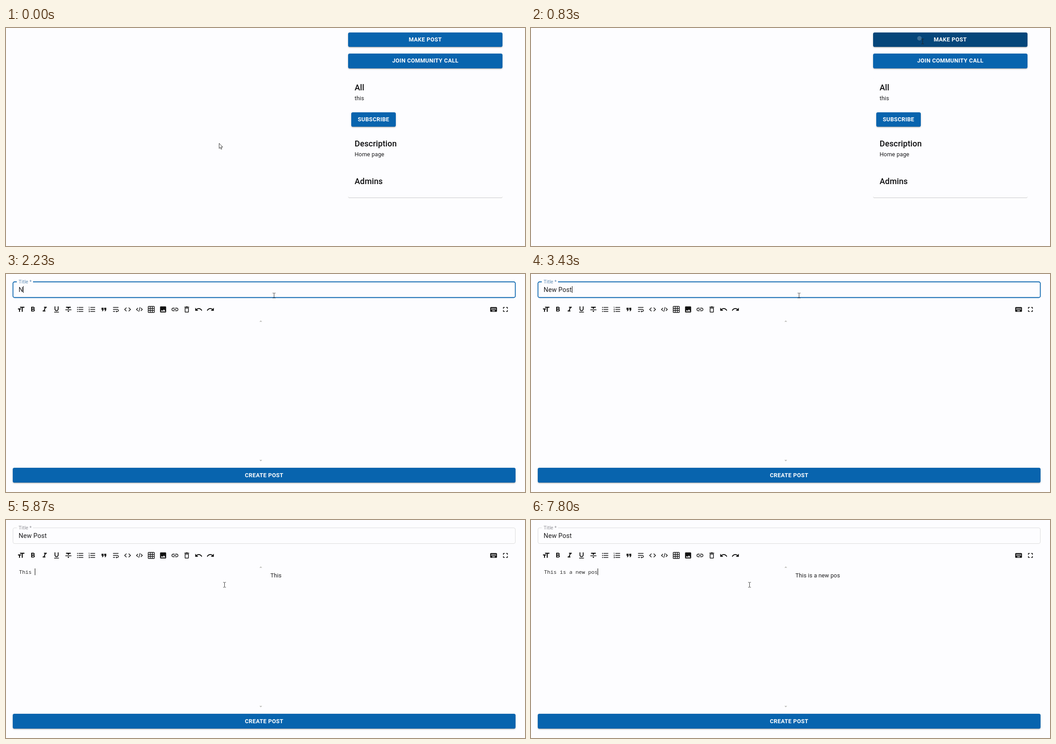
These frames come from a looping animation (1153 by 486 pixels, 8 s). An HTML page:

```html
<!DOCTYPE html>
<html lang="en">
<head>
<meta charset="utf-8">
<style>
html, body { margin: 0; width: 100%; height: 100%; overflow: hidden; background: #fdfdff; }
.button, .paper { position: absolute; border-radius: 3.6px; }
.button {
  background: #0864ae; overflow: hidden;
  box-shadow: 0 2.7px 1px -2px #0003, 0 1.8px 1.8px #0002, 0 1px 4px #0002;
}
.paper { left: 760px; top: 110px; width: 343px; height: 268px; box-shadow: 0 1px 0 #c8c8c8; }
#ripple { position: absolute; border-radius: 50%; background: #fff; }
svg { position: absolute; left: 0; top: 0; font: 12.6px Roboto, sans-serif; letter-spacing: .135px; fill: #1c1c1e; }
.caps { font-weight: 600; letter-spacing: .36px; text-anchor: middle; fill: #fff; }
.heading { font-size: 18px; font-weight: 500; fill: #0c0c0e; }
.field { font-size: 14.4px; }
.mono { font: 11.667px "Noto Sans Mono", monospace; letter-spacing: 0; fill: #2a2a2a; }
text { white-space: pre; }
</style>
</head>
<body>
<div id="home">
  <div class="button" id="make" style="left:760px;top:9.5px;width:343px;height:32.5px"><div id="ripple"></div></div>
  <div class="button" style="left:760px;top:57px;width:343px;height:32.5px"></div>
  <div class="button" style="left:767px;top:187.5px;width:99px;height:32px"></div>
  <div class="paper"></div>
  <svg width="1153" height="486">
    <g class="caps">
      <text x="931.5" y="30">MAKE POST</text>
      <text x="931.5" y="77">JOIN COMMUNITY CALL</text>
      <text x="816.5" y="208">SUBSCRIBE</text>
    </g>
    <g class="heading">
      <text x="774.5" y="139">All</text>
      <text x="774.5" y="264">Description</text>
      <text x="774.5" y="348">Admins</text>
    </g>
    <text x="774.5" y="161">this</text>
    <text x="774.5" y="285.5">Home page</text>
  </svg>
</div>
<div id="editor">
  <div class="button" style="left:15px;top:432px;width:1117px;height:32.5px"></div>
  <svg width="1153" height="486">
    <text class="caps" x="573.5" y="453">CREATE POST</text>
    <rect id="outline" x="15.5" y="17.5" width="1116" height="35" rx="3.6" fill="none"/>
    <rect id="notch" x="24" y="15" height="5" fill="#fdfdff"/>
    <text id="label" class="field">Title *</text>
    <text id="title" class="field" x="28" y="40"></text>
    <g id="icons" fill="#111" fill-rule="evenodd"></g>
    <path d="M563 106.5h6l-3-3zM563 414.5h6l-3 3z" fill="#b9b9b5"/>
    <text id="source" class="mono" x="29" y="120"></text>
    <text id="preview" x="587.5" y="128"></text>
    <rect id="caret" width="1" height="15" fill="#000"/>
  </svg>
</div>
<svg width="1153" height="486">
  <path id="cursor" stroke="#222" stroke-width=".9"/>
</svg>
<script>
const $ = id => document.getElementById(id);
const undo = 'M12.5 8c-2.65 0-5.05.99-6.9 2.6L2 7v9h9l-3.62-3.62c1.39-1.16 3.16-1.88 5.12-1.88 3.54 0 6.55 2.31 7.6 5.5l2.37-.78C21.08 11.03 17.15 8 12.5 8z';
const lines = 'M7 5h14v2H7zM7 11h14v2H7zM7 17h14v2H7z';
const dot = y => `M2.5 ${y}a1.5 1.5 0 1 0 3 0a1.5 1.5 0 1 0-3 0z`;
const cells = (xs, ys, s) => xs.flatMap(x => ys.map(y => `M${x} ${y}h${s}v${s}h-${s}z`)).join('');

const icons = [
  'M9 4v3h5v12h3V7h5V4H9zm-6 8h3v7h3v-7h3V9H3v3z',
  'M15.6 10.79c.97-.67 1.65-1.77 1.65-2.79 0-2.26-1.75-4-4-4H7v14h7.04c2.09 0 3.71-1.7 3.71-3.79 0-1.52-.86-2.82-2.15-3.42zM10 6.5h3c.83 0 1.5.67 1.5 1.5s-.67 1.5-1.5 1.5h-3v-3zm3.5 9H10v-3h3.5c.83 0 1.5.67 1.5 1.5s-.67 1.5-1.5 1.5z',
  'M10 4v3h2.21l-3.42 8H6v3h8v-3h-2.21l3.42-8H18V4z',
  'M12 17c3.31 0 6-2.69 6-6V3h-2.5v8c0 1.93-1.57 3.5-3.5 3.5S8.5 12.93 8.5 11V3H6v8c0 3.31 2.69 6 6 6zm-7 2v2h14v-2H5z',
  'M10 19h4v-3h-4v3zM5 4v3h5v3h4V7h5V4H5zM3 14h18v-2H3v2z',
  lines + dot(6) + dot(12) + dot(18),
  lines + 'M2 17h2v.5H3v1h1v.5H2v1h3v-4H2v1zm1-9h1V4H2v1h1v3zm-1 3h1.8L2 13.1v.9h3v-1H3.2L5 10.9V10H2v1z',
  'M6 17h3l2-4V7H5v6h3zm8 0h3l2-4V7h-6v6h3z',
  'M4 19h6v-2H4v2zM20 5H4v2h16V5zm-3 6H4v2h13.25c1.1 0 2 .9 2 2s-.9 2-2 2H15v-2l-3 3 3 3v-2h2c2.21 0 4-1.79 4-4s-1.79-4-4-4z',
  'M9.4 16.6L4.8 12l4.6-4.6L8 6l-6 6 6 6 1.4-1.4zm5.2 0l4.6-4.6-4.6-4.6L16 6l6 6-6 6-1.4-1.4z',
  'M7 7l-5 5 5 5 1.4-1.4L4.8 12l3.6-3.6zM17 7l5 5-5 5-1.4-1.4 3.6-3.6-3.6-3.6zM13 5h1.8l-3.8 14H9.2z',
  'M4 2h16q2 0 2 2v16q0 2-2 2H4q-2 0-2-2V4q0-2 2-2z' + cells([4, 10, 16], [4, 10, 16], 4),
  'M21 19V5c0-1.1-.9-2-2-2H5c-1.1 0-2 .9-2 2v14c0 1.1.9 2 2 2h14c1.1 0 2-.9 2-2zM8.5 13.5l2.5 3.01L14.5 12l4.5 6H5l3.5-4.5z',
  'M3.9 12c0-1.71 1.39-3.1 3.1-3.1h4V7H7c-2.76 0-5 2.24-5 5s2.24 5 5 5h4v-1.9H7c-1.71 0-3.1-1.39-3.1-3.1zM8 13h8v-2H8v2zm9-6h-4v1.9h4c1.71 0 3.1 1.39 3.1 3.1s-1.39 3.1-3.1 3.1h-4V17h4c2.76 0 5-2.24 5-5s-2.24-5-5-5z',
  'M6 19c0 1.1.9 2 2 2h8c1.1 0 2-.9 2-2V7H6v12zM8 9h8v10H8V9zm7.5-5l-1-1h-5l-1 1H5v2h14V4z',
  undo,
  undo,
  'M4 5h16q2 0 2 2v10q0 2-2 2H4q-2 0-2-2V7q0-2 2-2zM8 15h8v2H8z' + cells([5, 8, 11, 14, 17], [8, 11], 2),
  'M7 14H5v5h5v-2H7v-3zm-2-4h2V7h3V5H5v5zm12 7h-3v2h5v-5h-2v3zM14 5v2h3v3h2V5h-5z'
];
$('icons').innerHTML = icons.map((d, i) => {
  const x = i < 17 ? 33.4 + i * 26.3 : 1083.2 + (i - 17) * 26.3;
  const flip = i === 16 ? -1 : 1;
  return `<path d="${d}" transform="translate(${x} 79) scale(${.75 * flip} .75) translate(-12 -12)"/>`;
}).join('');

const cursors = {
  arrow: 'M.5 0V11.5L3 9.2 4.8 13.3 6.6 12.5 4.8 8.5H8.4Z',
  beam: 'M-3 -5.5H-1L0 -4.8 1 -5.5H3M0 -4.8V4.8M-3 5.5H-1L0 4.8 1 5.5H3',
  hand: 'M-1 1Q0-1 1 1V6Q3 5 3.2 6.5 5 5.7 5.4 7 7.4 6.3 7.4 8V11L6 15H0L-4 9.5Q-4 7.5-1 9.5Z'
};

// time, x, y of the pointer
const path = [[0, 473, 257], [30, 473, 257], [560, 861, 22], [790, 863, 23], [830, 870, 30],
  [900, 870, 30], [1400, 595.5, 48], [3960, 595.5, 48], [4340, 485.5, 144.5], [8000, 485.5, 144.5]];

// moment of each key press
const titleKeys = [2230, 2430, 2530, 2600, 2970, 3130, 3270, 3430];
const bodyKeys = [5100, 5300, 5430, 5600, 5770, 5900, 6070, 6330, 6430, 6600,
  6830, 6930, 7130, 7430, 7530, 7670, 7800];
const titleText = 'New Post', bodyText = 'This is a new post';

const ramp = (t, start, length) => Math.min(1, Math.max(0, (t - start) / length));
const easeOut = p => 1 - (1 - p) ** 3;
const typed = (keys, t) => keys.filter(k => k <= t).length;
const attrs = (id, values) => { for (const k in values) $(id).setAttribute(k, values[k]); };

function pointer(t) {
  const i = path.findIndex(p => p[0] > t);
  const [t0, x0, y0] = path[i - 1], [t1, x1, y1] = path[i];
  const p = ramp(t, t0, t1 - t0), e = p * p * (3 - 2 * p);
  return [x0 + (x1 - x0) * e, y0 + (y1 - y0) * e];
}

function drawHome(t) {
  const hover = ramp(t, 500, 250), mix = (a, b) => a + (b - a) * hover;
  $('make').style.background = `rgb(${mix(8, 5)},${mix(100, 70)},${mix(174, 122)})`;
  const r = t < 800 ? 0 : 5 + 350 * ramp(t, 830, 500) ** 1.3;
  $('ripple').style.cssText = `left:${103 - r}px;top:${13.5 - r}px;width:${2 * r}px;height:${2 * r}px;opacity:.22`;
}

function drawEditor(t) {
  const focused = t >= 1500 && t < 4370, inBody = t >= 4370;
  attrs('outline', {
    stroke: focused ? '#0864ae' : inBody ? '#dcdcdc' : '#222',
    'stroke-width': focused ? 1.8 : 1
  });
  const p = easeOut(ramp(t, 1500, 210));
  attrs('notch', { width: 36 * ramp(t, 1550, 100) });
  attrs('label', {
    transform: `translate(28 ${40.5 - 20 * p}) scale(${1 - .25 * p})`,
    fill: focused ? '#5f8cb4' : inBody ? '#909096' : '#7d7d7a'
  });

  const keys = inBody ? bodyKeys : titleKeys;
  const count = typed(keys, t);
  $('title').textContent = titleText.slice(0, typed(titleKeys, t));
  const body = bodyText.slice(0, typed(bodyKeys, t));
  $('source').textContent = $('preview').textContent = body;

  const lastAction = count ? keys[count - 1] : inBody ? 4370 : 1500;
  const on = t >= 1500 && (t - lastAction) % 1000 < 500;
  const x = inBody ? 29 + 7 * count : 28 + $('title').getComputedTextLength();
  attrs('caret', { x: Math.round(x), y: inBody ? 108 : 27, opacity: +on });
}

function drawCursor(t) {
  const [x, y] = pointer(t);
  const kind = t < 500 || (t > 1500 && y > 53 && y < 98) ? 'arrow' : t < 815 ? 'hand' : 'beam';
  attrs('cursor', {
    d: cursors[kind], transform: `translate(${x} ${y})`, fill: kind === 'beam' ? 'none' : '#fff',
    // no pointer is shown while keys are pressed only if it leaves the stage
    opacity: 1
  });
}

function frame() {
  const t = performance.now() % 8000, home = t < 1000;
  $('home').style.display = home ? '' : 'none';
  $('editor').style.display = home ? 'none' : '';
  (home ? drawHome : drawEditor)(t);
  drawCursor(t);
  requestAnimationFrame(frame);
}
frame();
</script>
</body>
</html>
```
